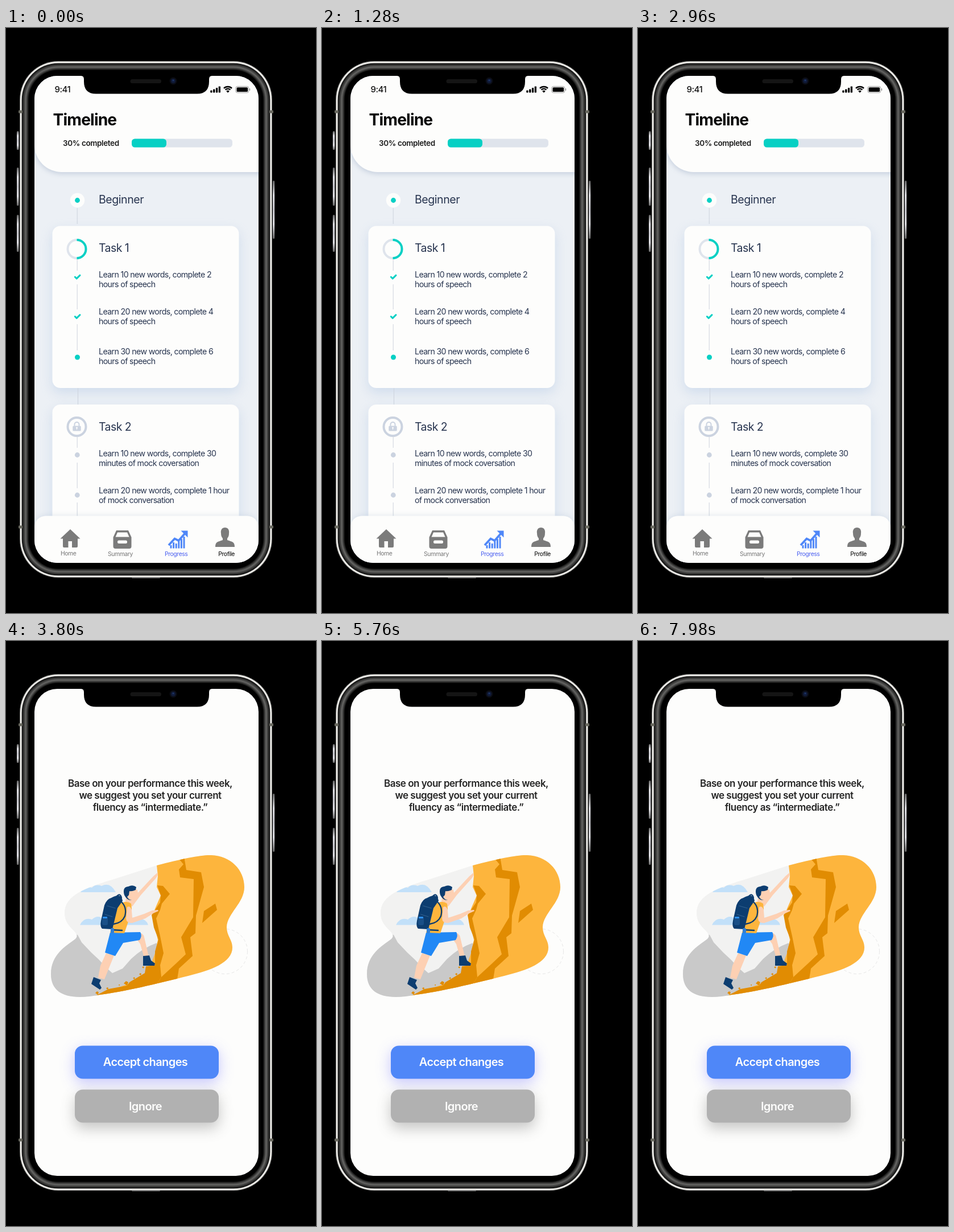
Recreate the animation shown at these times as an HTML page with a canvas. Size 545 by 1027 pixels, loop 8 s.

```html
<!DOCTYPE html>
<html lang="en">
<head>
<meta charset="utf-8">
<title>Progress timeline</title>
<style>
  html, body { margin: 0; width: 100%; height: 100%; overflow: hidden; background: #000; }
  canvas { display: block; width: 545px; height: 1027px; }
</style>
</head>
<body>
<canvas id="stage" width="545" height="1027"></canvas>
<script>
const ctx = document.getElementById('stage').getContext('2d');
const LOOP = 8000, SWITCH = 3340;
const WHITE = '#fdfdfc', INK = '#27344f', TEAL = '#06d0c4', PALE = '#dfe4ec',
      LOCKED = '#cbd3e0', ICON = '#7b7b7b', BLUE = '#4f87f8',
      SKIN = '#fdd0b3', NAVY = '#0c3d70', ROCK = '#fdb53d', CRACK = '#e18c02';

function box(x, y, w, h, r, color, shadow) {
  ctx.save();
  if (shadow) [ctx.shadowColor, ctx.shadowBlur, ctx.shadowOffsetY] = shadow;
  ctx.fillStyle = color;
  ctx.beginPath();
  ctx.roundRect(x, y, w, h, r);
  ctx.fill();
  ctx.restore();
}

function dot(x, y, r, color) {
  ctx.fillStyle = color;
  ctx.beginPath();
  ctx.arc(x, y, r, 0, Math.PI * 2);
  ctx.fill();
}

function arc(x, y, r, from, to, width, color) {
  ctx.strokeStyle = color;
  ctx.lineWidth = width;
  ctx.beginPath();
  ctx.arc(x, y, r, from * Math.PI, to * Math.PI);
  ctx.stroke();
}

function shape(d, color) {
  ctx.fillStyle = color;
  ctx.fill(new Path2D(d));
}

function stroke(d, color, width, cap = 'round') {
  ctx.strokeStyle = color;
  ctx.lineWidth = width;
  ctx.lineCap = cap === 'round' ? 'round' : 'butt';
  ctx.lineJoin = cap;
  ctx.stroke(new Path2D(d));
  ctx.lineCap = 'butt';
  ctx.lineJoin = 'miter';
}

function text(str, x, y, size, { weight = 400, color = INK, track = -0.028, align = 'left' } = {}) {
  ctx.font = `${weight} ${size}px Inter, "Liberation Sans", sans-serif`;
  ctx.letterSpacing = `${track * size}px`;
  ctx.textAlign = align;
  ctx.fillStyle = color;
  ctx.fillText(str, x, y);
}

function vertical(stops, y0, y1) {
  const g = ctx.createLinearGradient(0, y0, 0, y1);
  stops.forEach((c, i) => g.addColorStop(i / (stops.length - 1), c));
  return g;
}

function drawBody() {
  const metal = ['#666', '#dcdce0', '#c4c4ca', '#dcdce0', '#666'];
  for (const [y, h] of [[181, 33], [245, 67], [328, 65]])
    box(19, y, 3.5, h, 1.5, vertical(metal, y, y + h));
  box(469, 268, 3.2, 102, 1.5, vertical(metal, 268, 370));

  const layers = [
    [0, '#7d7d7b'], [1, '#eeede9'], [3.7, '#161616'], [5.5, '#2c2c2b'], [7.5, '#484847'],
    [9.5, '#646462'], [11.5, '#484847'], [13.5, '#232322'], [15.5, '#000']
  ];
  for (const [inset, color] of layers)
    box(24 + inset, 58 + inset, 444 - 2 * inset, 907 - 2 * inset, 68 - inset, color);

  for (const y of [144.5, 873.5])
    for (const x of [22, 463]) box(x, y, 7, 5, 1, '#68685f');
  box(221, 964, 50, 2, 1, '#777');
}

function drawNotch() {
  shape('M132 83H362V84Q357 84 357 90V94Q357 115.5 336 115.5H158Q137 115.5 137 94V90Q137 84 132 84Z', '#000');
  box(218.5, 90, 54.5, 7, 3.5, '#151515');
  dot(294, 93, 6.5, '#0b0d14');
  dot(294, 93, 4, '#101a38');
  dot(294, 92, 1.5, '#1f3768');
}

function drawStatus() {
  text('9:41', 85.5, 113.3, 15, { weight: 500, color: '#111', track: -0.03 });
  [4, 6, 8.5, 11].forEach((h, i) => box(359.3 + i * 4.8, 113.5 - h, 3.3, h, 0.8, '#000'));
  for (const r of [10, 6.3]) arc(390, 113, r, 1.25, 1.75, 2.3, '#000');
  shape('M390 113.7L387.2 110.7Q390 108.5 392.8 110.7Z', '#000');
  ctx.strokeStyle = '#999';
  ctx.lineWidth = 1;
  ctx.beginPath();
  ctx.roundRect(403.8, 102.6, 23, 11, 3);
  ctx.stroke();
  box(405.5, 104.2, 19.6, 7.8, 1.6, '#000');
  box(427.8, 106, 1.4, 4, 0.7, '#999');
}

function rail(...spans) {
  for (const [from, to] of spans) box(124.7, from, 1, to - from, 0, '#cdd3dd');
}

function task(title, y, lines) {
  text(title, 163, y, 19.5);
  for (const [top, first, second] of lines) {
    text(first, 163, top, 14.2, { track: -0.045 });
    text(second, 163, top + 17, 14.2, { track: -0.045 });
  }
}

function drawCards() {
  const shadow = ['rgba(150,180,220,.32)', 20, 8];
  rail([316, 344]);
  dot(125.5, 302.5, 12.7, WHITE);
  dot(125.5, 302.5, 4.4, TEAL);
  text('Beginner', 163, 307.8, 19.5, { track: -0.022 });

  box(81.5, 347.5, 328, 284.5, 14, WHITE, shadow);
  rail([406, 426], [450, 494], [520, 566]);
  box(126, 632, 1, 29, 0, '#cdd3dd');
  arc(124.5, 388, 16, 0.5, 1.5, 4, PALE);
  arc(124.5, 388, 16, -0.5, 0.5, 4, TEAL);
  for (const y of [437, 506.5]) stroke(`M121.3 ${y}L124.2 ${y + 2.8}L130 ${y - 2.8}`, TEAL, 3);
  dot(125.5, 578, 4.5, TEAL);
  task('Task 1', 392.6, [
    [438, 'Learn 10 new words, complete 2', 'hours of speech'],
    [503, 'Learn 20 new words, complete 4', 'hours of speech'],
    [572.5, 'Learn 30 new words, complete 6', 'hours of speech']
  ]);

  box(81.5, 661, 328, 260, 14, WHITE, shadow);
  rail([718, 737], [763, 808], [833, 857]);
  arc(124.5, 700, 16, 0, 2, 4, LOCKED);
  box(117.3, 698.5, 14.4, 9, 1.5, LOCKED);
  stroke('M120.5 698V696A4 4 0 0 1 128.5 696V698', LOCKED, 2);
  dot(124.5, 702, 1.4, WHITE);
  box(124, 702, 1, 3.2, 0, WHITE);
  dot(125.3, 749.5, 4.4, LOCKED);
  dot(125.3, 820, 4.4, LOCKED);
  task('Task 2', 706.6, [
    [751.5, 'Learn 10 new words, complete 30', 'minutes of mock coversation'],
    [817, 'Learn 20 new words, complete 1 hour', 'of mock conversation']
  ]);
}

function drawTabs() {
  box(50, 856.5, 394, 110, 20, WHITE, ['rgba(150,170,200,.25)', 10, -1]);

  shape('M113 880L130.5 896.5H126V910Q126 912 124 912H116V901H109.5V912H102Q100 912 100 910V896.5H95.5Z', ICON);

  shape('M194 882H215L220.5 894V910Q220.5 914 216.5 914H192.5Q188.5 914 188.5 910V894Z', ICON);
  shape('M196 885.5H213L216.5 893.5H192.5Z', WHITE);
  box(196, 899.5, 17, 5.5, 2.5, WHITE);

  stroke('M286 908L296.5 896.5L303.5 900L314 888', BLUE, 3.8, 'miter');
  shape('M307.5 882.5H319.5V894.5Z', BLUE);
  [908, 903, 905, 901, 897, 893].forEach((y, i) => box(288.5 + i * 4.6, y, 3, 913.5 - y, 0, BLUE));

  shape('M385 877C390 877 393 881 392 887Q392 893 389 896V899C398 902 402 902 402 911H368C368 902 372 902 381 899V896Q378 893 378 887C377 881 380 877 385 877Z', ICON);

  const labels = [['Home', 96, 925.5, '#777'], ['Summary', 179, 926.5, '#777'],
                  ['Progress', 279, 926.5, '#4a5ff0'], ['Profile', 373.3, 926.5, '#000']];
  for (const [label, x, y, color] of labels) text(label, x, y, 10.4, { color, track: -0.04 });
}

function drawTimeline() {
  box(50, 84, 394, 855, 0, '#ecf0f5');
  drawCards();
  box(50, 40, 440, 213, [0, 0, 0, 48], WHITE, ['rgba(130,150,180,.35)', 9, 3]);
  drawStatus();
  text('Timeline', 82.5, 171.3, 28.2, { weight: 700, color: '#060606', track: -0.03 });
  text('30% completed', 100, 206.5, 13.5, { weight: 600, color: '#1c1c1c' });
  box(221, 194.5, 177, 15, 5.5, PALE);
  box(221, 194.5, 61, 15, 5.5, TEAL);
  drawTabs();
}

function drawRock() {
  shape('M265 394L267 412L265 432L272 447L262 470L258 482L267 525L262 548L247 590L155 624L260 640L440 600V360H265Z', ROCK);
  shape('M266 429L276 430L288 444L274 461L271 472L264 487L271 518L277 548L271 569L273 590L262 608L155 624L180 611L213 605L217 599L244 583L246 571L262 569V545L268 524L260 503L256 481L271 459L272 446Z', CRACK);
  shape('M302 380L313 378L317 402L343 406L348 432L334 482L333 513L324 520L328 553L304 575L300 600L260 612L273 590L298 567L316 550L308 520L329 485L330 418L306 415L304 401L312 392Z', CRACK);
  shape('M348 474L368 461L371 472L345 495Z', CRACK);
  for (const [x, y, r] of [[211, 601, 4], [225, 592, 1.8], [236, 585, 2], [241, 573, 1.8], [199, 604, 1.2], [178, 610, 2], [160, 618, 3]])
    shape(`M${x - r} ${y}L${x} ${y - r}L${x + r} ${y - r / 2}L${x + r / 2} ${y + r}Z`, CRACK);
}

function drawHiker() {
  // legs and boots
  shape('M230 512Q241 511 243 520L251 554L243 556L236 532L229 522Z', SKIN);
  shape('M176 548L190 552L173 594L162 591L166 570Z', SKIN);
  shape('M241 553L252 552L255 561L262 566L261 570H241Z', NAVY);
  shape('M154 590L167 595L164 601L168 609L165 612L150 602Z', NAVY);
  shape('M183 512L236 511Q240 517 235 525L206 530L192 553L174 547Z', '#2188f5');

  // reaching arm, neck and head
  shape('M215 464L231 443L259 413L266 407L267 411L263 417L237 446L222 466Z', SKIN);
  shape('M212 446L223 452L221 462L209 461Z', SKIN);
  shape('M211 438Q222 432 231 437L233 447Q231 455 223 454Q212 452 211 438Z', SKIN);
  shape('M208 446Q204 432 215 431Q223 427 229 432L228 437Q221 440 217 439L216 446L213 449Q215 454 221 455Q213 456 208 446Z', NAVY);

  // vest, pack and near arm
  shape('M196 463Q211 454 220 461L221 470L216 490L208 513L183 512L188 490Z', ROCK);
  shape('M185 451Q197 444 203 449L205 456L196 469L187 506L169 505Q165 501 167 491L173 464Q177 453 185 451Z', NAVY);
  stroke('M194 449Q201 441 203 451', NAVY, 2.2);
  stroke('M178 465L192 469', '#315f8d', 1.2);
  stroke('M174 480L187 484', '#315f8d', 1.2);
  box(169, 485, 10, 14, 3, '#194f87');
  box(170, 484, 8, 3, 1, '#2d91f5');
  stroke('M203 458Q213 468 209 483Q204 495 189 497', NAVY, 2.3);
  stroke('M186 507L204 508', NAVY, 2.5);
  box(184, 504, 6, 9, 2, '#2f7fd6');
  shape('M213 467Q219 464 221 473L222 486L243 479L257 473L267 472L268 474L259 478L245 487L222 495Q212 496 211 487Z', SKIN);
}

function drawIllustration() {
  ctx.setLineDash([5, 4]);
  arc(385, 545, 39.5, 0, 2, 1, '#e6e6e6');
  ctx.setLineDash([]);

  ctx.save();
  ctx.clip(new Path2D('M103 478C103 452 125 437 187 419L265 394C310 382 345 375 361 376C395 377 419 402 419 432C419 460 389 478 388 502C388 518 398 524 398 538C398 565 360 578 320 588C265 602 205 616 165 621C110 632 79 620 79 585C79 550 105 536 122 523C134 512 103 505 103 478Z'));
  box(70, 360, 360, 280, 0, '#f2f2f1');
  shape('M60 500L126 516L133 529L150 547L163 559L178 575L187 583L205 575L220 558Q240 539 265 530V650H60Z', '#c9c9c9');
  shape('M131 441Q138 430 151 433Q158 426 168 430Q183 422 193 441Z', '#c2e0f9');
  shape('M130 498.5Q137 484 151 489Q162 479 172 489L205 491Q218 482 232 488Q246 486 250 498.5Z', '#c2e0f9');
  drawRock();
  ctx.restore();
  drawHiker();
}

function drawSuggestion() {
  box(50, 84, 394, 855, 0, WHITE);
  ['Base on your performance this week,', 'we suggest you set your current', 'fluency as “intermediate.”']
    .forEach((line, i) => text(line, 253.5, 255.6 + i * 21, 17, { weight: 600, color: '#242424', align: 'center' }));
  drawIllustration();
  const label = { weight: 600, color: WHITE, align: 'center', track: -0.03 };
  box(121, 710.5, 253, 58, 14, BLUE, ['rgba(100,100,255,.36)', 24, 7]);
  text('Accept changes', 245, 746.3, 20, label);
  box(121, 787.5, 253, 58, 14, '#b1b1b1', ['rgba(80,80,80,.32)', 24, 10]);
  text('Ignore', 245, 824.2, 20, label);
}

function draw(now) {
  ctx.fillStyle = '#000';
  ctx.fillRect(0, 0, 545, 1027);
  drawBody();
  ctx.save();
  ctx.beginPath();
  ctx.roundRect(50, 84, 394, 855, 40);
  ctx.clip();
  if (now % LOOP < SWITCH) drawTimeline();
  else drawSuggestion();
  ctx.restore();
  drawNotch();
}

const start = performance.now();
function frame() {
  draw(performance.now() - start);
  requestAnimationFrame(frame);
}
frame();
</script>
</body>
</html>
```
